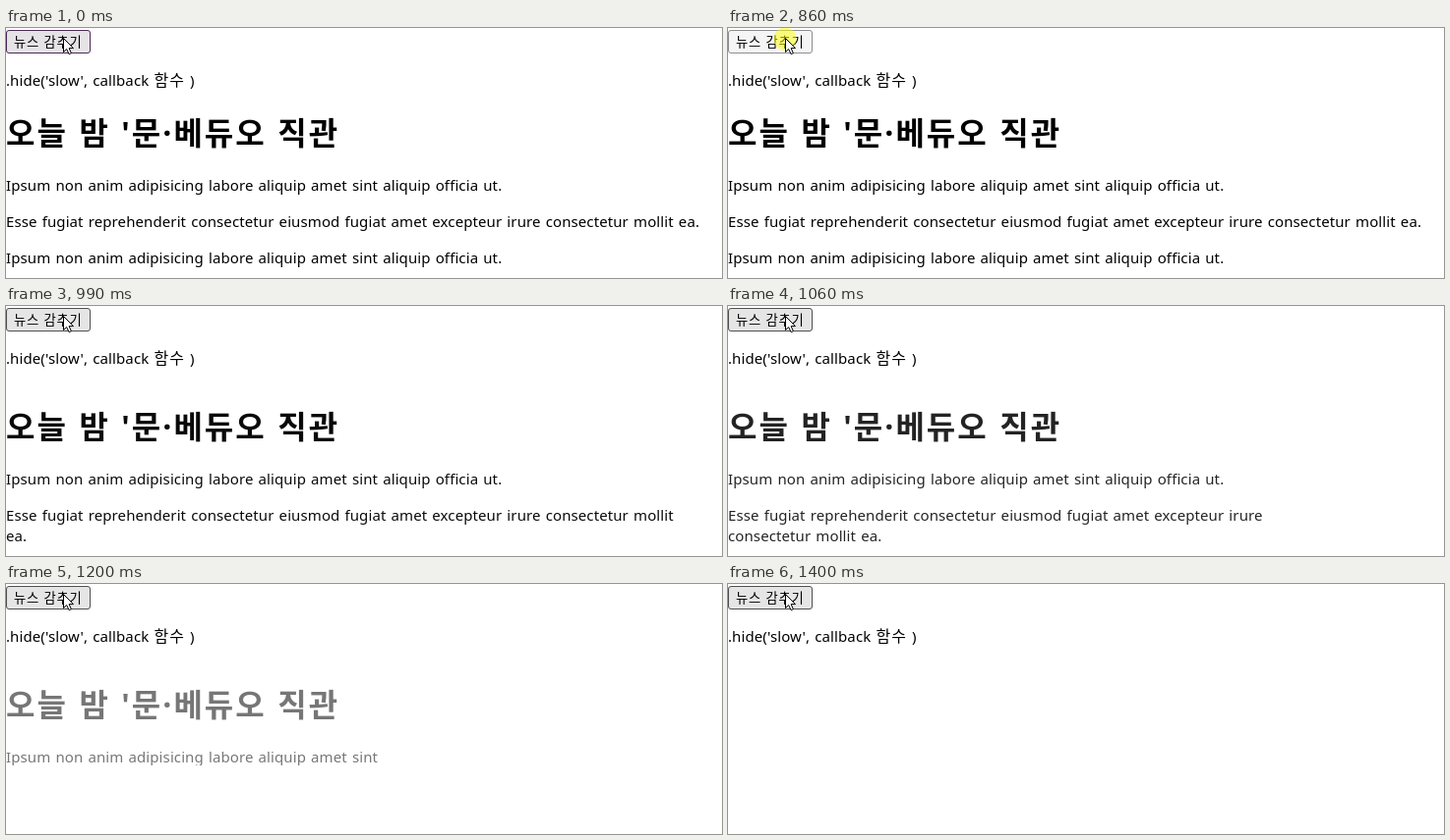
Recreate the animation shown at these times as an HTML page. Size 728 px wide and 255 px high, loop 2.2 s.

```html
<!DOCTYPE html>
<html lang="ko">
<head>
<meta charset="utf-8">
<title>hide</title>
<style>
  html, body { margin: 0; width: 100%; height: 100%; overflow: hidden; background: #fff; }
  body {
    position: relative;
    box-sizing: border-box;
    padding-top: 43px;
    color: #000;
    font: 15px/21px "Noto Sans", "Noto Sans CJK KR", "Noto Sans CJK", sans-serif;
    letter-spacing: .1px;
    word-spacing: 1.1px;
  }
  p { margin: 0 0 16px; }
  .ko { font-size: 16px; letter-spacing: 1px; }
  h1 {
    margin: 21.44px 0;
    font-size: 32px;
    line-height: 43px;
    letter-spacing: 2px;
    word-spacing: 1.2px;
  }
  #news { width: 728px; }
  #btn {
    position: absolute;
    left: 0;
    top: 2px;
    width: 86px;
    height: 24px;
    box-sizing: border-box;
    padding: 0 0 0 7px;
    border: 1px solid #4f4f4f;
    border-radius: 3px;
    background: #e5e5e5;
    color: #000;
    font: 13.33px/23px "Noto Sans", "Noto Sans CJK KR", "Noto Sans CJK", sans-serif;
    letter-spacing: .8px;
    word-spacing: 0;
    text-align: left;
    white-space: nowrap;
  }
  #btn.focus { border-color: #4b2a55; background: #e5e3e5; }
  #btn.active { border-color: #8d8d8d; background: #f5f5f5; }
  svg { position: absolute; left: 0; top: 0; }
</style>
</head>
<body>
<button id="btn" tabindex="-1">뉴스 감추기</button>
<p>.hide('slow', callback <span class="ko">함수</span> )</p>
<div id="news">
  <h1>오늘 밤 '문·베듀오 직관</h1>
  <p>Ipsum non anim adipisicing labore aliquip amet sint aliquip officia ut.</p>
  <p>Esse fugiat reprehenderit consectetur eiusmod fugiat amet excepteur irure consectetur mollit ea.</p>
  <p>Ipsum non anim adipisicing labore aliquip amet sint aliquip officia ut.</p>
</div>
<svg width="100" height="40">
  <circle id="press" cx="58" cy="11" r="11.5" fill="#ff0" fill-opacity=".5"/>
  <path d="M58.5 10.5v14l3.2-3 2.4 5.2 2.3-1-2.3-5.1h4.4z" fill="#fff" stroke="#000"/>
</svg>
<script>
  const LOOP = 2200, DOWN = 790, UP = 900, START = 912, SLOW = 600;
  const WIDTH = 728, HEIGHT = 197;
  // the screen refreshes only at these moments
  const TICKS = [0, 790, 860, 930, 990, 1060, 1130, 1200, 1260, 1330, 1400];

  const [btn, news, press] = ['btn', 'news', 'press'].map(id => document.getElementById(id));
  const swing = p => .5 - Math.cos(p * Math.PI) / 2;
  let last = -1;

  function draw(t) {
    const held = t >= DOWN && t < UP;
    press.style.display = held ? '' : 'none';
    btn.className = t < 860 ? 'focus' : held ? 'active' : '';

    const hiding = t >= START;
    const left = hiding ? 1 - swing(Math.min(1, (t - START) / SLOW)) : 1;
    const s = news.style;
    s.overflow = hiding ? 'hidden' : 'visible';
    s.width = WIDTH * left + 'px';
    s.height = hiding ? HEIGHT * left + 'px' : 'auto';
    s.opacity = left;
    s.visibility = t >= 1400 ? 'hidden' : 'visible';
  }

  function loop() {
    const now = performance.now() % LOOP;
    const tick = TICKS.filter(t => t <= now).pop();
    if (tick !== last) draw(last = tick);
    requestAnimationFrame(loop);
  }
  loop();
</script>
</body>
</html>
```
